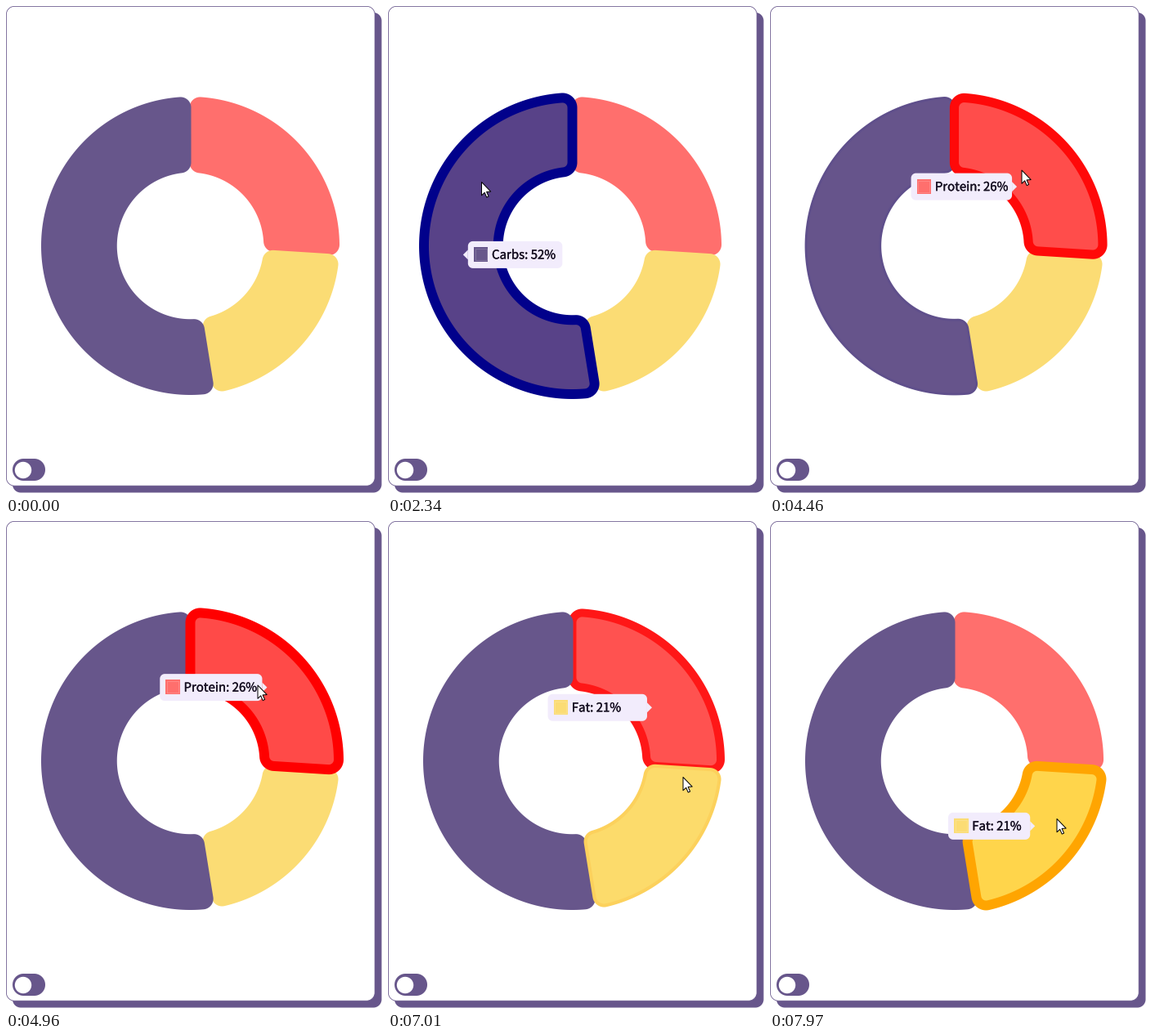
A matplotlib script for the animation above (8000 ms loop, 460 by 596 pixels).

```python
import numpy as np
import matplotlib.pyplot as plt
from matplotlib.animation import FuncAnimation
from matplotlib.colors import to_rgb
from matplotlib.patches import Circle, Polygon
from matplotlib.patheffects import withStroke

W, H, DPI = 460, 596, 64
PX = 72 / DPI  # points per pixel
LOOP, STEP = 8000, 40

PURPLE, PAPER, INK = "#67568b", "#f2ecfc", "#171022"
CX, CY, R_OUT, R_IN, ROUND = 225.5, 293.5, 181.5, 90.75, 12
RING_MS, TIP_MS, FADE_MS = 1500, 2112, 1056
TIP_H, CARET, GAP = 33, 6, 2

# label, share of the ring, fill, hover fill, hover edge, tooltip width, hover span
SLICES = [
    ("Protein: 26%", 0.260, "#ff6f6d", "#ff4a48", "#ff0000", 125.5, (3760, 6925)),
    ("Fat: 21%", 0.2145, "#fbdc74", "#ffd54b", "#ffa500", 98.5, (6925, LOOP)),
    ("Carbs: 52%", 0.5255, PURPLE, "#584288", "#00008b", 115.5, (1270, 3760)),
]

# pointer tip: time, x, y
POINTER = np.array([
    (160, 46, -22), (900, 76, 123), (1000, 76, 123), (1260, 97, 166),
    (1360, 97, 166), (1640, 114, 215), (2900, 114, 215), (3700, 187, 203),
    (3770, 228, 201), (4100, 307.5, 200.5), (6250, 307.5, 200.5),
    (7010, 360.5, 313), (7110, 360.5, 313), (7800, 350.5, 364),
])
ARROW = np.array([(0, 0), (0, 16.3), (3.7, 12.8), (6.2, 18.6), (8.6, 17.5),
                  (6.1, 11.9), (11.2, 11.6)])
# short stalls of 100 ms
STALLS = (900, 1260, 1720, 2340, 4500, 5760, 7010, 7850)


def arc(x, y, r, a, b, n=16):
    t = np.linspace(a, b, n)
    return np.column_stack([x + r * np.cos(t), y + r * np.sin(t)])


def round_rect(x0, y0, x1, y1, r):
    q = np.pi / 2
    return np.vstack([
        arc(x0 + r, y0 + r, r, 2 * q, 3 * q), arc(x1 - r, y0 + r, r, 3 * q, 4 * q),
        arc(x1 - r, y1 - r, r, 0, q), arc(x0 + r, y1 - r, r, q, 2 * q),
    ])


def ring_slice(a, b):
    """Ring segment with rounded corners, clockwise from angle a to b."""
    q = np.pi / 2
    ro, ri = R_OUT - ROUND, R_IN + ROUND
    do, di = ROUND / ro, ROUND / ri

    def corner(r, mid, start, end):
        return arc(CX + r * np.cos(mid), CY + r * np.sin(mid), ROUND, start, end)

    return np.vstack([
        arc(CX, CY, R_OUT, a + do, b - do, 160),
        corner(ro, b - do, b - do, b + q),
        corner(ri, b - di, b + q, b - di + 2 * q),
        arc(CX, CY, R_IN, b - ROUND / R_IN, a + ROUND / R_IN, 120),
        corner(ri, a + di, a + di + 2 * q, a + 3 * q),
        corner(ro, a + do, a - q, a + do),
    ])


def ease(ms, length):
    """Quartic ease-out."""
    return 1 - (1 - np.clip(ms / length, 0, 1)) ** 4


def mix(c0, c1, p):
    return tuple((1 - p) * np.array(to_rgb(c0)) + p * np.array(to_rgb(c1)))


def hover_level(span, t):
    return ease(t - span[0], RING_MS) - ease(t - span[1], RING_MS)


fig = plt.figure(figsize=(W / DPI, H / DPI), dpi=DPI, facecolor="white")
ax = fig.add_axes([0, 0, 1, 1])
ax.set_xlim(0, W)
ax.set_ylim(H, 0)
ax.axis("off")


def shape(points, fill, z, edge="none", lw=0.0):
    return ax.add_patch(Polygon(points, closed=True, facecolor=fill, edgecolor=edge,
                                linewidth=lw * PX, zorder=z, joinstyle="round"))


# card and toggle
shape(round_rect(8, 8, 459.5, 595.5, 10), PURPLE, 0)
shape(round_rect(0.4, 0.4, 451.2, 587.2, 10), "white", 0.1, PURPLE, 0.8)
shape(round_rect(8, 554, 48, 581, 13.4), PURPLE, 0.2)
ax.add_patch(Circle((21, 568), 10.2, color="white", lw=0, zorder=0.3))

# ring slices and where their tooltips rest
rings, homes = [], []
angle = -np.pi / 2
for label, share, fill, _, _, width, _ in SLICES:
    end = angle + share * 2 * np.pi
    rings.append(shape(ring_slice(angle, end), fill, 1, fill, 2))
    mid, r = (angle + end) / 2, (R_OUT + R_IN) / 2
    x, y = CX + r * np.cos(mid), CY + r * np.sin(mid)
    shift = GAP + CARET
    left = x + shift if x < CX else x - shift - width
    homes.append(np.array([left, y, width]))
    angle = end

box = shape(round_rect(0, 0, 9, 9, 4), PAPER, 5)
caret = shape([(0, 0), (1, 0), (1, 1)], PAPER, 5)
swatch = shape([(0, 0), (1, 0), (1, 1)], PURPLE, 6)
inset = shape([(0, 0), (1, 0), (1, 1)], "none", 6.1, "white", 0.8)
text = ax.text(0, 0, "", family="Noto Sans CJK JP", size=15 * PX, color=INK,
               va="baseline", ha="left", zorder=7,
               path_effects=[withStroke(linewidth=0.35 * PX, foreground=INK)])
tip_parts = (box, caret, swatch, text)
pointer = shape(ARROW, "white", 9, "black", 1)


def square(x, y, half):
    return [(x - half, y - half), (x + half, y - half),
            (x + half, y + half), (x - half, y + half)]


def draw_tooltip(t, active):
    first = SLICES[2][6][0]
    alpha = float(np.clip((t - first) / FADE_MS, 0, 1))
    for part in tip_parts:
        part.set_alpha(alpha)
    inset.set_alpha(alpha * 0.2)
    if active is None:
        text.set_text("")
        return
    label, _, fill, _, _, _, span = SLICES[active]
    home = homes[active]
    start = homes[{0: 2, 1: 0, 2: 2}[active]]
    x, y, w = start + (home - start) * ease(t - span[0], TIP_MS)
    box.set_xy(round_rect(x, y - TIP_H / 2, x + w, y + TIP_H / 2, 6))
    side, out = (x, -CARET) if active == 2 else (x + w, CARET)
    caret.set_xy([(side, y - CARET), (side + out, y), (side, y + CARET)])
    swatch.set_xy(square(x + 15.8, y - 0.4, 8.8))
    inset.set_xy(square(x + 15.8, y - 0.4, 7))
    swatch.set_facecolor(fill)
    text.set_text(label)
    text.set_position((x + 29.2, y + 5))


def draw(i):
    t = (i + 0.5) * STEP
    for s in STALLS:
        if s <= t < s + 100:
            t = s
    active = None
    for k, (_, _, fill, hot, edge, _, span) in enumerate(SLICES):
        p = hover_level(span, t)
        rings[k].set_facecolor(mix(fill, hot, p))
        rings[k].set_edgecolor(mix(fill, edge, p))
        rings[k].set_linewidth((2 + 10 * p) * PX)
        on = span[0] <= t < span[1]
        rings[k].set_zorder(3 if on else 1 + 0.1 * k)
        if on:
            active = k
    draw_tooltip(t, active)
    tip = [np.interp(t, POINTER[:, 0], POINTER[:, c]) for c in (1, 2)]
    pointer.set_xy(ARROW + np.array(tip) + (0.5, 0.5))
    return [*rings, *tip_parts, inset, pointer]


anim = FuncAnimation(fig, draw, frames=LOOP // STEP, interval=STEP,
                     init_func=lambda: draw(0), repeat=True, repeat_delay=0)
plt.show()
```
